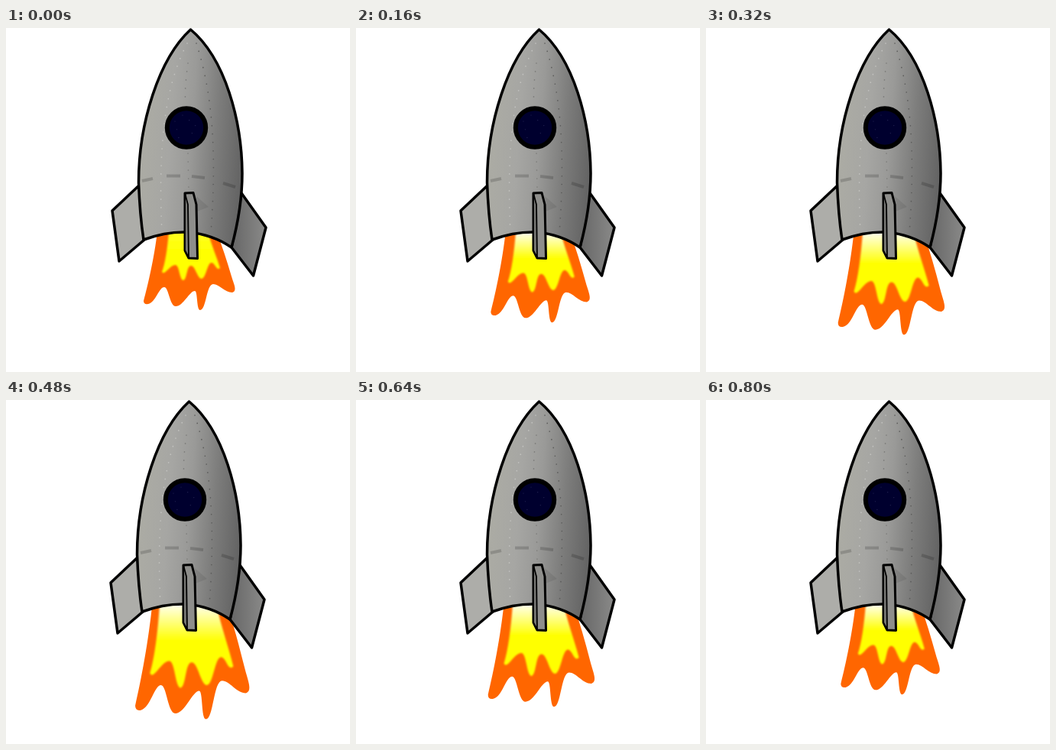
Animation, 450 px wide and 450 px high, one loop 960 ms. Source, as an HTML page:

```html
<!DOCTYPE html>
<html lang="en">
<head>
<meta charset="utf-8">
<title>Rocket</title>
<style>
  html, body { margin: 0; width: 100%; height: 100%; overflow: hidden; background: #fff; }
  svg { display: block; width: 100%; height: 100%; }
</style>
</head>
<body>
<svg viewBox="0 0 450 450">
  <defs>
    <linearGradient id="hull" gradientUnits="userSpaceOnUse" x1="172" y1="140" x2="308" y2="150">
      <stop offset="0" stop-color="#acaca4"/>
      <stop offset=".3" stop-color="#a6a6a3"/>
      <stop offset=".5" stop-color="#9a9a98"/>
      <stop offset=".75" stop-color="#7c7c7b"/>
      <stop offset="1" stop-color="#646464"/>
    </linearGradient>
    <linearGradient id="shade">
      <stop offset="0" stop-color="#666"/>
      <stop offset="1" stop-color="#8a8a89"/>
    </linearGradient>
    <linearGradient id="glow" gradientUnits="userSpaceOnUse" x1="0" y1="268" x2="0" y2="295">
      <stop id="heat" offset="0"/>
      <stop offset="1" stop-color="#ff0"/>
    </linearGradient>
    <filter id="soft"><feGaussianBlur stdDeviation="1"/></filter>
  </defs>

  <path id="outer" fill="#f60" d="M198 266C194 300 186 335 180 357Q180 362 186 361
    C196 359 200 339 207 339C213 339 214 364 222 364C232 364 240 344 247 344
    C251 344 249 369 254 369C262 369 262 335 271 335C279 335 286 346 296 346
    C303 344 298 335 295 325C289 305 283 285 275 266Z"/>
  <g filter="url(#soft)">
    <path id="inner" fill="url(#glow)" d="M213 266C211 290 208 308 204 319
      C207 325 215 309 222 310C227 311 227 330 232 330C237 329 236 311 242 311
      C248 311 250 328 256 328C262 327 263 307 269 307C274 308 275 318 280 314
      C276 300 269 285 264 266Z"/>
  </g>

  <g id="rocket" stroke="#000" stroke-width="3.5" stroke-linejoin="round">
    <path fill="#adada9" d="M172 206L137 239L146 305L179 277Z"/>
    <path fill="url(#shade)" d="M306 216L338 261L321.500 324L293 287Z"/>
    <path fill="url(#hull)" d="M239.500 2C198 40 171.500 125 171.500 202Q173 244 178 277
      Q207 266 236 267Q268 270 293 287Q307 235 307 190C306.500 122 285 40 239.500 2Z"/>
    <path fill="none" stroke-opacity=".17" stroke-width="4"
      d="M176 200L190 197M208 193.500L226 193.500M241 194L258 196M282 203L298 208"/>
    <g fill="none" stroke-width="1.700" stroke-linecap="round" stroke-dasharray="0 11">
      <path stroke="#c2c2bf" d="M235 20C209 70 196 140 202 268"/>
      <path stroke="#5c5c5b" d="M247 20C268 85 274 160 266 268"/>
      <path stroke="#7c7c7a" d="M236 46C232 75 232 90 233 100M236 164L237 210"/>
    </g>
    <circle cx="234" cy="130.500" r="25.200" fill="#00002e" stroke-width="6"/>
    <path fill="none" stroke="#29295a" stroke-width="1.200" stroke-linecap="round" stroke-dasharray="0 11"
      d="M219 122L224 144M229 114L246 127L238 145"/>
    <path fill-opacity=".08" stroke="none" d="M247 220L263 234L248 240Z"/>
    <path fill="#8e8e8b" stroke-width="3" d="M232 216L243 215.500L247 231L248.500 301.500L237 301L232 291Z"/>
    <path fill="#777774" stroke-width="1.800" d="M232 216L236 231L237 300L232 291Z"/>
  </g>
</svg>
<script>
const STEP = 160;
const PEAK = 3;
const NOZZLE_Y = 268;

const set = (id, name, value) => document.getElementById(id).setAttribute(name, value);

// Stretch a flame away from the nozzle.
function stretch(id, centerX, scaleX, scaleY) {
  set(id, "transform",
    `translate(${centerX} ${NOZZLE_Y}) scale(${scaleX} ${scaleY}) translate(${-centerX} ${-NOZZLE_Y})`);
}

function draw() {
  // Thrust rises 0, 1, 2, 3 and falls back in hard steps.
  const step = Math.floor(performance.now() / STEP) % (2 * PEAK);
  const thrust = PEAK - Math.abs(PEAK - step);
  stretch("outer", 224, 1 + .083 * thrust, 1 + .16 * thrust);
  stretch("inner", 240, 1 + .145 * thrust, 1 + .25 * thrust);
  set("heat", "stop-color", `rgb(255, 255, ${thrust ? 235 : 30})`);
  set("rocket", "transform", `translate(${thrust ? 0 : 2})`);
  requestAnimationFrame(draw);
}
draw();
</script>
</body>
</html>
```
